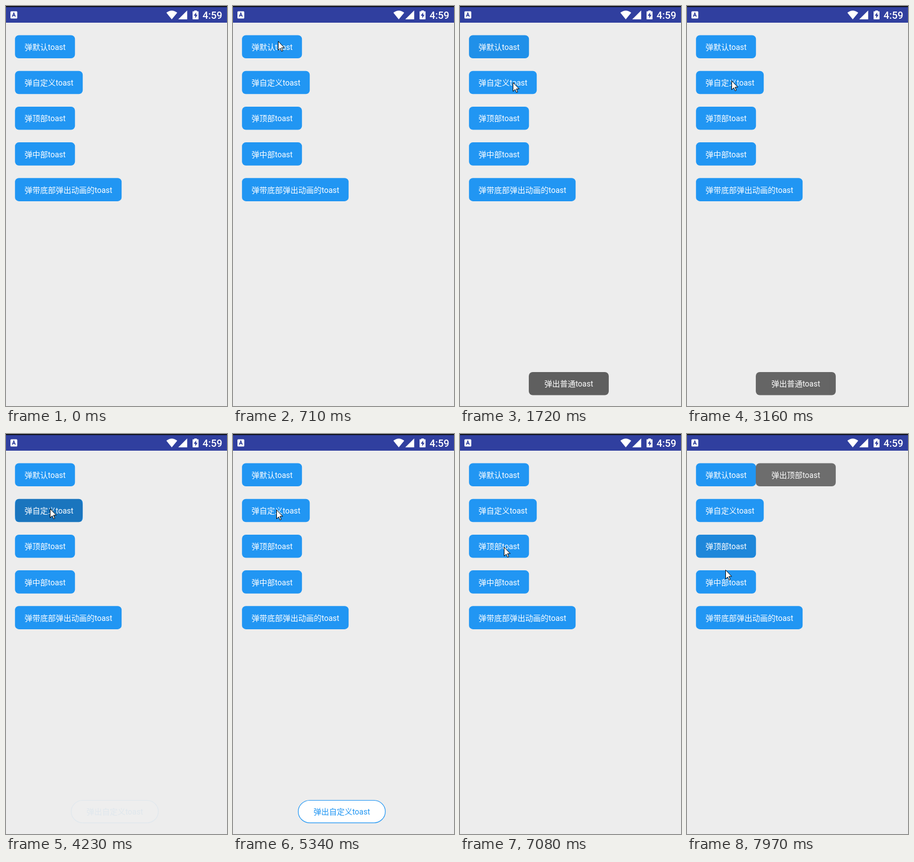
Animation, 398 px wide and 719 px high, one loop 8000 ms. Source, as an HTML page:

```html
<!DOCTYPE html>
<html lang="zh-CN">
<head>
<meta charset="utf-8">
<title>Toast demo</title>
<style>
  html, body { margin: 0; width: 100%; height: 100%; overflow: hidden; background: #ededed; }
  svg { display: block; width: 398px; height: 719px; }
  text { font: 14px Roboto, "Noto Sans CJK SC", "Noto Sans CJK", sans-serif; fill: #fff; }
  .clock { font-size: 18px; font-weight: 500; }
  .outlined rect { fill: #fff; stroke: #2196f3; stroke-width: 1.2px; }
  .outlined text { fill: #2196f3; }
</style>
</head>
<body>
<svg viewBox="0 0 398 719" xmlns="http://www.w3.org/2000/svg">
  <rect width="398" height="30" fill="#303f9f"/>
  <rect width="398" height="2" fill="#10131f"/>
  <g fill="#fff">
    <rect x="8" y="9.5" width="12.3" height="13" rx="1.5"/>
    <path d="M298.5 24L288.8 12Q298.5 4.4 308.4 12Z"/>
    <path d="M326.3 8V24H310.2Z"/>
    <path d="M336 10.2Q336 9.5 336.7 9.5H339.2V8H343.6V9.5H346Q346.7 9.5 346.7 10.2V23.3Q346.7 24 346 24H336.7Q336 24 336 23.3Z"/>
  </g>
  <path d="M342.4 11.5L338 17.6H340.8V22L345 15.8H342.4Z" fill="#303f9f"/>
  <path d="M11.3 19.3L14.1 12.6L16.9 19.3M12.4 17.2H15.8" fill="none" stroke="#303f9f" stroke-width="1.6"/>
  <text class="clock" x="354" y="23">4:59</text>
  <g id="buttons"></g>
  <g id="toasts"></g>
  <circle id="click" r="12" fill="#ff0" fill-opacity=".47"/>
  <path id="cursor" d="M.5.5V16.5L4.2 13L6.6 18.5L8.9 17.5L6.5 12H11.5Z" fill="#fff" stroke="#000"/>
</svg>
<script>
const LOOP = 8000, SIZE = 14, TALL = 41.6, TOP = 52.5, GAP = 64.2, LOW = 657.9;
const $ = id => document.getElementById(id);

function add(parent, tag, attrs, text) {
  const el = document.createElementNS("http://www.w3.org/2000/svg", tag);
  for (const k in attrs) el.setAttribute(k, attrs[k]);
  if (text) el.textContent = text;
  return parent.appendChild(el);
}

// Every label is some CJK characters plus "toast", which is 32 px wide
const textWidth = s => (s.length - 5) * SIZE + 32;

const labels = ["弹默认toast", "弹自定义toast", "弹顶部toast", "弹中部toast", "弹带底部弹出动画的toast"];
const buttons = labels.map((label, i) => {
  const box = { x: 16.2, y: TOP + i * GAP, width: textWidth(label) + 34, height: TALL, rx: 7 };
  const g = add($("buttons"), "g", {});
  add(g, "rect", { ...box, fill: "#2196f3" });
  add(add(g, "clipPath", { id: "clip" + i }), "rect", box);
  const ripple = add(g, "circle", {
    cx: box.x + box.width / 2, cy: box.y + TALL / 2, "clip-path": `url(#clip${i})`
  });
  add(g, "text", { x: 33.5, y: box.y + 26.4 }, label);
  return { ripple };
});

// Each tap presses button i and fades a toast in and out
const taps = [
  { click: 757, press: 1120, show: [1260, 1590], hide: [3100, 3560], y: LOW, text: "弹出普通toast" },
  { click: 3710, press: 4230, show: [4090, 4960], hide: [6540, 7080], y: LOW, text: "弹出自定义toast", outlined: true },
  { click: 7320, press: 7570, show: [7710, 8040], hide: [9550, 10010], y: TOP, text: "弹出顶部toast" }
];
for (const tap of taps) {
  const inner = textWidth(tap.text), pad = 28;
  const x = 195.9 - inner / 2, inset = tap.outlined ? .6 : 0;
  tap.toast = add($("toasts"), "g", { class: tap.outlined ? "outlined" : "" });
  add(tap.toast, "rect", {
    x: x - pad + inset, y: tap.y + inset, width: inner + 2 * (pad - inset), height: TALL - 2 * inset,
    rx: tap.outlined ? TALL / 2 : 7, fill: "#5f5f5f"
  });
  add(tap.toast, "text", { x, y: tap.y + 26.4 }, tap.text);
}

// Pointer glides: start, end, new tip x, y. The first begins off stage.
const enter = 90, origin = [433, 1079];
const glides = [
  [-420, 600, 81, 63], [1450, 1720, 95, 137], [2640, 2690, 80, 134], [3480, 3560, 79, 134],
  [4300, 4600, 78, 135], [5290, 5870, 81, 206], [6190, 6250, 79, 203], [7640, 7970, 69, 244]
];

const ease = (t, [a, b]) => {
  const p = Math.min(1, Math.max(0, (t - a) / (b - a)));
  return (1 - Math.cos(Math.PI * p)) / 2;
};

function tip(t) {
  let [x, y] = origin;
  for (const [a, b, toX, toY] of glides) {
    const p = ease(t, [a, b]);
    x += (toX - x) * p;
    y += (toY - y) * p;
  }
  return [Math.round(x), Math.round(y)];
}

function draw(t) {
  const place = `translate(${tip(t)})`;
  $("cursor").setAttribute("transform", place);
  $("cursor").setAttribute("opacity", t < enter ? 0 : 1);
  $("click").setAttribute("transform", place);
  $("click").setAttribute("opacity", taps.some(k => t >= k.click && t < k.click + 100) ? 1 : 0);
  taps.forEach((tap, i) => {
    const age = t - tap.press, { ripple } = buttons[i];
    ripple.setAttribute("r", Math.max(0, 61.5 + age / 4));
    ripple.setAttribute("opacity", age < 0 ? 0 : Math.max(0, .22 * (1 - age / 740)));
    tap.toast.setAttribute("opacity", age < 0 ? 0 : ease(t, tap.show) * (1 - ease(t, tap.hide)));
  });
}

const start = performance.now();
function tick() {
  draw((performance.now() - start) % LOOP);
  requestAnimationFrame(tick);
}
tick();
</script>
</body>
</html>
```
